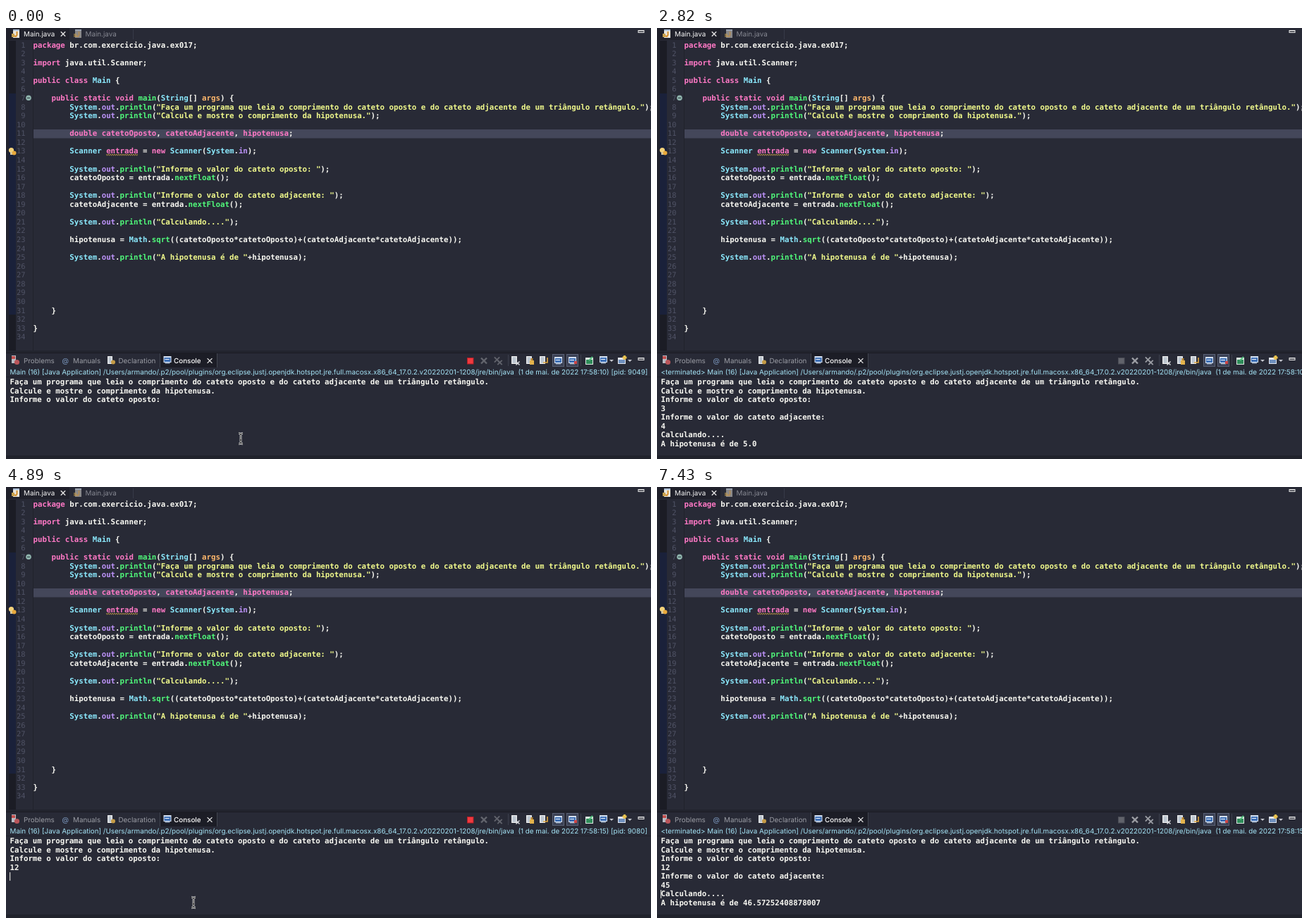
Animation, 915 px wide and 612 px high, one loop 8 s. Source, as an HTML page with a canvas:

```html
<!DOCTYPE html>
<html lang="pt">
<head>
<meta charset="utf-8">
<title>Console</title>
<style>
html, body { margin: 0; width: 915px; height: 612px; overflow: hidden; background: #282a36; }
canvas, svg { position: absolute; left: 0; top: 0; }
text { white-space: pre; text-rendering: geometricPrecision; font: 9.85px Inter, "Liberation Sans", sans-serif; }
.mono { font: bold 10.76px "DejaVu Sans Mono", monospace; }
.num { font: 10.4px "DejaVu Sans Mono", monospace; text-anchor: end; }
</style>
</head>
<body>
<canvas id="c" width="915" height="612"></canvas>
<svg id="s" width="915" height="612"></svg>
<script>
const g = document.getElementById('c').getContext('2d');
const svg = document.getElementById('s');
const CELL = 6.48, ROW = 12.565, OUT_ROW = 12.51, WHITE = '#f8f8f2', GREY = '#9b9da5';

function node(name, attrs, parent = svg) {
  const el = document.createElementNS('http://www.w3.org/2000/svg', name);
  for (const k in attrs) el.setAttribute(k, attrs[k]);
  return parent.appendChild(el);
}
function label(x, y, str, fill, cls = '') {
  const el = node('text', { x, y, fill, class: cls });
  el.textContent = str;
  return el;
}
function rect(x, y, w, h, color) {
  g.fillStyle = color;
  g.fillRect(x, y, w, h);
}
function line(color, width, ...p) {
  g.strokeStyle = color;
  g.lineWidth = width;
  g.beginPath();
  for (let i = 0; i < p.length; i += 2) g.lineTo(p[i], p[i + 1]);
  g.stroke();
}
function disc(x, y, r, color) {
  g.fillStyle = color;
  g.beginPath();
  g.arc(x, y, r, 0, 7);
  g.fill();
}
function cross(x, y, r, color, width) {
  line(color, width, x - r, y - r, x + r, y + r);
  line(color, width, x + r, y - r, x - r, y + r);
}
function page(x, w = 8) {
  rect(x, 466, w, 11, '#e4e6e8');
  for (let y = 468; y < 475; y += 2) rect(x + 1.5, y, w - 3, 0.8, '#8296ad');
}
function monitor(x, y) {
  rect(x, y, 11, 9, '#d6e2f3');
  rect(x + 1, y + 2, 9, 6, '#3d6fb5');
  rect(x + 2, y + 4, 6, 1, '#eef4ff');
  rect(x + 2, y + 9, 7, 1.5, '#9aabc2');
}
function javaFile(x, alpha) {
  g.globalAlpha = alpha;
  rect(x + 2, 2, 9, 12, '#e9e6dc');
  rect(x + 2, 2, 9, 2, '#a9bcd4');
  line('#d7902c', 2, x + 7.5, 5, x + 7.5, 10, x + 6, 12, x + 3, 11);
  rect(x, 8, 4, 5, '#c9a24e');
  g.globalAlpha = 1;
}
function arrowDown(x) {
  for (let i = 0; i < 3; i++) rect(x + i, 471 + i, 5 - 2 * i, 1, '#c5c7cf');
}
function minimize(y) {
  rect(896.5, y, 9, 4, '#e8e8e8');
  rect(897.5, y + 1.5, 7, 1.5, '#30323d');
}

function drawEditor() {
  rect(0, 0, 915, 612, '#282a36');
  rect(0, 0, 4, 458, '#22242e');
  rect(4, 18, 10, 440, '#1b1c25');
  rect(4, 93, 10, 314, '#1a213a');
  rect(38, 18, 1, 440, '#20222c');
  rect(39, 144, 876, 12.5, '#44475a');
  rect(0, 0, 90, 17, '#20212b');
  rect(180, 2, 1, 14, '#373a48');
  javaFile(8, 1);
  javaFile(96, 0.5);
  cross(81, 8.5, 3.2, '#e4e4e4', 1.3);
  minimize(3);

  disc(32, 99.3, 3.8, '#8fb4ad');
  rect(30, 98.8, 4, 1, '#27333c');
  // quick-fix marker
  disc(7.5, 173.5, 3.6, '#f3d27a');
  rect(6, 176, 4, 4, '#d8c9a0');
  disc(11.5, 177.5, 3, '#e9a93b');
  const wave = [];
  for (let i = 0; i <= 30; i++) wave.push(142 + i * 1.5, 179.4 + i % 2 * 1.4);
  line('#e0b04c', 1, ...wave);
}

function drawPanel() {
  rect(0, 458, 915, 3, '#22242e');
  rect(0, 461, 915, 1, '#1b1c24');
  rect(218, 462, 82, 20, '#41444f');
  rect(219, 462, 80, 20, '#1c1d26');
  rect(0, 495, 915, 1, '#20222b');
  rect(0, 607, 915, 5, '#21232c');

  rect(8, 465, 6, 11, '#b8bcc4');
  rect(8, 466, 5, 4, '#c4504f');
  disc(15.5, 474.5, 3.6, '#b9555a');
  page(144, 7);
  disc(152, 474.5, 3, '#c59b45');
  monitor(223.5, 466);
  cross(289, 472.5, 3.4, '#e8e8e8', 1.3);

  for (const x of [712, 815]) rect(x, 464, 1, 16, '#3d404d');
  for (const x of [717, 738, 757]) page(x);
  cross(726, 476, 2.5, '#d9dbe0', 1.4);
  rect(743, 472, 6, 6, '#e3b24c');
  rect(744.5, 469, 3, 3, '#b8862f');
  line('#e0a63f', 1.6, 768, 468, 768, 475, 762, 475);
  for (const x of [775, 795]) {
    rect(x, 463, 17, 18, '#5a6175');
    rect(x + 1, 464, 15, 16, '#3a4054');
    monitor(x + 3, 467);
  }
  rect(806, 473, 4, 4, '#cf4545');
  rect(822, 468, 11, 10, '#dce8e2');
  rect(823, 471, 9, 6, '#2f8c5a');
  line('#54c37f', 2, 827, 472, 832, 467);
  monitor(842, 466);
  arrowDown(856.5);
  rect(868, 468, 11, 9, '#e2e6ee');
  rect(869, 471, 9, 5, '#6e8fbd');
  rect(876, 465, 3, 6, '#eac14f');
  rect(874.5, 466.5, 6, 3, '#eac14f');
  arrowDown(882.5);
  minimize(468);
}

function drawButtons(run) {
  rect(650, 464, 60, 17, '#282a36');
  rect(654, 468, 9.5, 9.5, run ? '#b51f27' : '#4b4d56');
  rect(655, 469, 7.5, 7.5, run ? '#f03a3f' : '#61636b');
  const ink = run ? '#63656e' : '#9c9ea5';
  cross(678, 472.5, 4, ink, 2.4);
  cross(696.5, 471, 3.6, ink, 1.8);
  cross(700.5, 475, 3.2, ink, 1.8);
}

const intro = 'Faça um programa que leia o comprimento do cateto oposto e do cateto adjacente de um triângulo retângulo.';
const goal = 'Calcule e mostre o comprimento da hipotenusa.';
const ask = side => `Informe o valor do cateto ${side}:`;
const say = s => `        System.out.println(${s});`;
const code = `package br.com.exercicio.java.ex017;

import java.util.Scanner;

public class Main {

    public static void main(String[] args) {
${say(`"${intro}"`)}
${say(`"${goal}"`)}

        double catetoOposto, catetoAdjacente, hipotenusa;

        Scanner entrada = new Scanner(System.in);

${say(`"${ask('oposto')} "`)}
        catetoOposto = entrada.nextFloat();

${say(`"${ask('adjacente')} "`)}
        catetoAdjacente = entrada.nextFloat();

${say('"Calculando...."')}

        hipotenusa = Math.sqrt((catetoOposto*catetoOposto)+(catetoAdjacente*catetoAdjacente));

${say('"A hipotenusa é de "+hipotenusa')}





    }

}
`.split('\n');
const rules = [
  ['"[^"]*"', '#f1fa8c'],
  ['(?<=(?:import|package) .*)\\S+', WHITE],
  ['\\b(?:package|import|public|class|static|void|double|new)\\b|(?<=double .*)\\w+|(?<=Scanner )entrada', '#ff79c6'],
  ['\\b(?:System|Scanner|String|Main|Math)\\b', '#8be9fd'],
  ['\\b(?:println|main|nextFloat|sqrt)\\b', '#50fa7b'],
  ['\\b(?:out|in)\\b', '#bd93f9'],
  ['\\bargs\\b', '#ffb86c']
];
const lexer = new RegExp(rules.map(r => `(${r[0]})`).join('|'), 'g');

function codeLine(y, src) {
  const body = src.trimStart();
  const el = label(38.5 + (src.length - body.length) * CELL, y, '', WHITE, 'mono');
  const span = (s, fill) => { if (s) node('tspan', { fill }, el).textContent = s; };
  let at = 0;
  for (const m of body.matchAll(lexer)) {
    span(body.slice(at, m.index), WHITE);
    span(m[0], rules[m.slice(1).findIndex(v => v !== undefined)][1]);
    at = m.index + m[0].length;
  }
  span(body.slice(at), WHITE);
}

drawEditor();
drawPanel();
code.forEach((src, i) => {
  const y = 27.6 + i * ROW;
  label(27.5, y, i + 1, '#505366', 'num');
  codeLine(y, src);
});
label(25, 12.3, 'Main.java', '#f4f4f4');
label(112.5, 12.3, 'Main.java', '#858791');
label(25, 476.2, 'Problems', GREY);
label(79.5, 476, '@', '#7f9cc4');
label(95, 476.2, 'Manuals', GREY);
const decl = label(159.5, 476.2, 'Declaration', GREY);
label(238, 476.2, 'Console', '#ffffff').style.fontWeight = 500;
const head = label(5.5, 492, '', '#a4e3f5');
const rows = Array.from({ length: 8 }, (_, i) => label(5.5, 506.4 + i * OUT_ROW, '', WHITE, 'mono'));
const caret = node('rect', { width: 1, height: 12, fill: WHITE });

const beam = node('g', { fill: 'none' });
const beamPath = 'M-3 -7.5Q0 -7.5 0 -5.5Q0 -7.5 3 -7.5M0 -5.5V5.5M-3 7.5Q0 7.5 0 5.5Q0 7.5 3 7.5M-1.5 2H1.5';
node('path', { d: beamPath, stroke: '#fff', 'stroke-width': 2.6 }, beam);
node('path', { d: beamPath, stroke: '#111' }, beam);
const arrow = node('path', { d: 'M0 0V13L3 10.2L5 15L7.2 14L5.2 9.5H9.3Z', stroke: '#fff' });

const path = '/Users/armando/.p2/pool/plugins/org.eclipse.justj.openjdk.hotspot.jre.full.macosx.x86_64_17.0.2.v20220201-1208/jre/bin/java';
const runs = [
  { a: '3', b: '4', sum: '5.0', stamp: '17:58:10', pid: 9049 },
  { a: '12', b: '45', sum: '46.57252408878007', stamp: '17:58:15', pid: 9080 }
];

// [start, visible rows, caret row]; no caret row while it is blinked off
const steps = [
  [0, 3], [290, 4, 3], [440, 4, 4], [590, 5, 4], [740, 6, 5], [880, 6, 6],
  [1030, 8, 6], [1630, 8], [2220, 8, 6], [2820, 8],
  [3410, 3, 0], [4000, 3], [4450, 4, 3], [4750, 4], [4890, 4, 4],
  [5040, 5, 4], [5640, 5], [5940, 6, 5], [6230, 6, 6],
  [6380, 8, 6], [6830, 8], [7430, 8, 6]
];

// The pointer moves in ticks of about 148 ms: up out of view, then back down to the console.
function pointer(t) {
  if (t < 2820) {
    const k = Math.max(0, Math.floor((t - 2220) / 150) / 3) ** 1.5;
    return [333 - 35 * k, 583 - 337 * k];
  }
  if (t < 3560 || t >= 7430) return null;
  const k = 1 - (1 - Math.min(1, Math.floor((t - 3560) / 147) / 4)) ** 2;
  return [218 + 48 * k, 485 + 105 * k];
}

function show(el, on) { el.setAttribute('visibility', on ? 'visible' : 'hidden'); }

function render(t) {
  const [, count, row] = steps.findLast(s => s[0] <= t);
  const second = t >= 3410;
  const run = second ? t < 6230 : t < 880;
  const r = runs[+second];
  const typed = second && t < 6090 ? r.b[0] : r.b;
  const out = [intro, goal, ask('oposto'), r.a, ask('adjacente'), typed, 'Calculando....', 'A hipotenusa é de ' + r.sum];
  rows.forEach((el, i) => { el.textContent = i < count ? out[i] : ''; });
  head.textContent = `${run ? '' : '<terminated> '}Main (16) [Java Application] ${path}  (1 de mai. de 2022 ${r.stamp}) [pid: ${r.pid}]`;
  drawButtons(run);

  show(caret, row !== undefined);
  const typing = row === count - 1;
  caret.setAttribute('x', 5.2 + (typing ? out[row].length * CELL : 0));
  caret.setAttribute('y', 497 + (row || 0) * OUT_ROW);

  const at = pointer(t);
  const hover = at && at[1] > 462 && at[1] < 496;
  show(beam, at && !hover);
  show(arrow, hover);
  if (at) (hover ? arrow : beam).setAttribute('transform', `translate(${at})`);
  decl.setAttribute('fill', hover ? '#d2d4da' : GREY);
}

function tick(now) {
  render(now % 8000);
  requestAnimationFrame(tick);
}
render(0);
requestAnimationFrame(tick);
</script>
</body>
</html>
```
